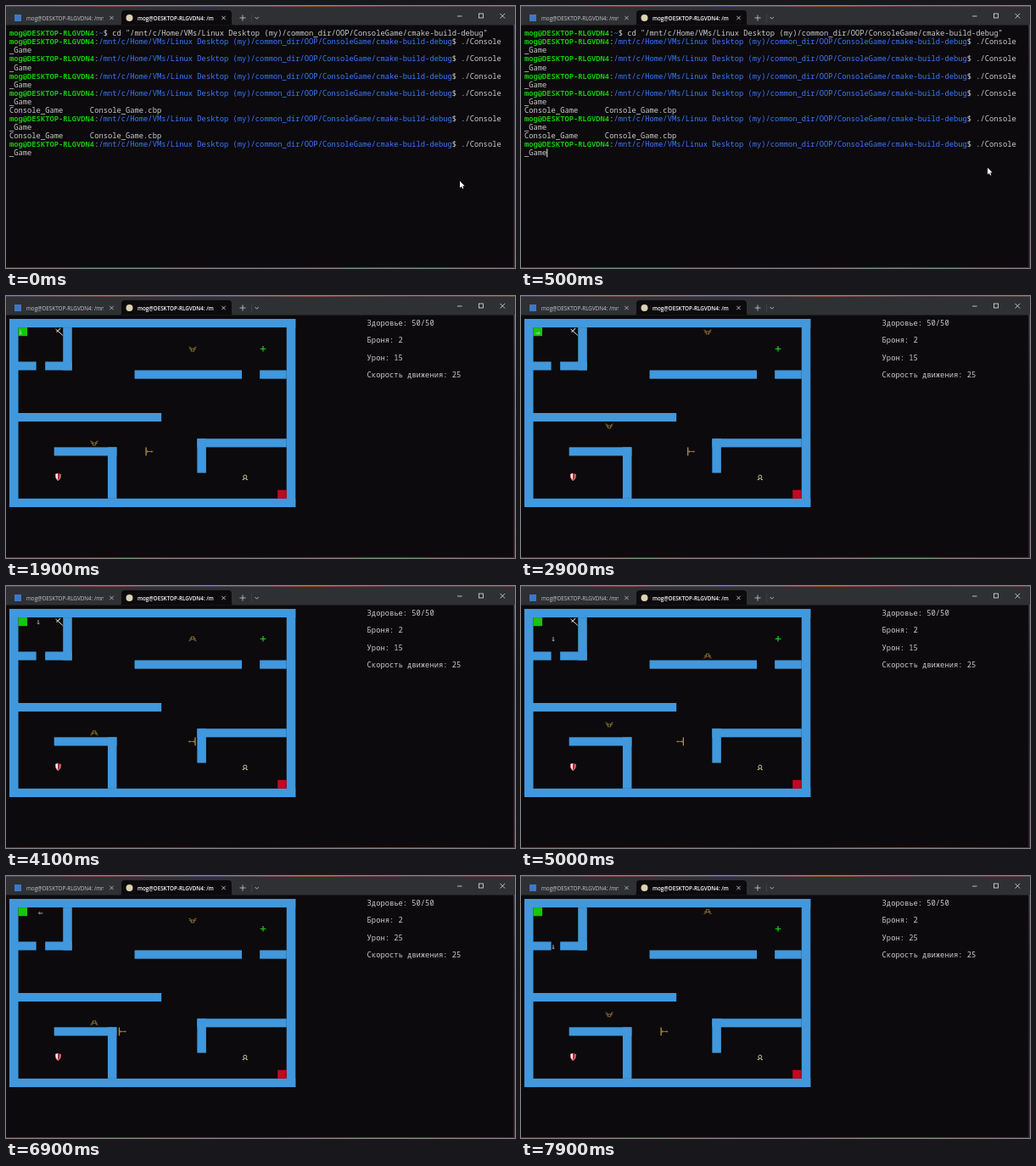
Recreate the animation shown at these times as an HTML page with a canvas. Size 600 by 309 pixels, loop 8000 ms.

```html
<!DOCTYPE html>
<html lang="en">
<head>
<meta charset="utf-8">
<title>Console game</title>
<style>
  html, body { margin: 0; width: 100%; height: 100%; overflow: hidden; background: #0c0a0c; }
  canvas { display: block; width: 600px; height: 309px; }
</style>
</head>
<body>
<canvas id="stage"></canvas>
<script>
const W = 600, H = 309, LOOP = 8000, STEP = 100;
const GAME_START = 1900, PICKUP = 6300;
const X0 = 4, Y0 = 27, CW = 5.27, CELL = CW * 2, ROW = 10.09;
const MONO = '"Noto Sans Mono", "DejaVu Sans Mono", monospace';
const UI = '"Open Sans", "Noto Sans", sans-serif';
const GREY = '#cccccc', GREEN = '#16c60c', BLUE = '#3b78ff', WALL = '#4198dc';
const HOST = 'mog@DESKTOP-RLGVDN4';
const DIR = '/mnt/c/Home/VMs/Linux Desktop (my)/common_dir/OOP/ConsoleGame/cmake-build-debug';

const canvas = document.getElementById('stage');
const ctx = canvas.getContext('2d');
const dpr = window.devicePixelRatio || 1;
canvas.width = W * dpr;
canvas.height = H * dpr;

// Walls in cells: column, row, width, height
const WALLS = [
  [0, 0, 32, 1], [0, 21, 32, 1], [0, 0, 1, 22], [31, 0, 1, 22],
  [0, 5, 3, 1], [4, 5, 3, 1], [6, 1, 1, 5],
  [14, 6, 12, 1], [28, 6, 3, 1], [0, 11, 17, 1],
  [5, 15, 7, 1], [11, 15, 1, 6], [21, 14, 10, 1], [21, 14, 1, 4]
];

// Player poses: time, column, row, glyph
const POSES = [
  [1900, 1, 1, '⇓'], [2800, 1, 1, '⇒'], [3200, 2, 1, '⇒'], [3400, 3, 1, '⇒'],
  [3600, 3, 1, '⇓'], [4200, 3, 2, '⇓'], [4800, 3, 3, '⇓'], [5300, 3, 3, '⇑'],
  [5500, 3, 2, '⇑'], [5800, 3, 1, '⇑'], [5900, 3, 1, '⇒'], [6100, 4, 1, '⇒'],
  [6300, 5, 1, '⇒'], [6500, 5, 1, '⇐'], [6700, 4, 1, '⇐'], [6900, 3, 1, '⇐'],
  [7100, 3, 1, '⇓'], [7600, 3, 2, '⇓'], [7700, 3, 3, '⇓'], [7800, 3, 4, '⇓'],
  [7900, 3, 5, '⇓']
];

const colX = c => X0 + c * CELL;
const rowY = r => Y0 + r * ROW;

function rect(x, y, w, h, color) {
  ctx.fillStyle = color;
  ctx.fillRect(x, y, w, h);
}

function disc(x, y, r, color) {
  ctx.fillStyle = color;
  ctx.beginPath();
  ctx.arc(x, y, r, 0, Math.PI * 2);
  ctx.fill();
}

// Each line is a flat list of x, y pairs
function strokes(lines, color, width = 1) {
  ctx.strokeStyle = color;
  ctx.lineWidth = width;
  ctx.beginPath();
  for (const p of lines) {
    ctx.moveTo(p[0], p[1]);
    for (let i = 2; i < p.length; i += 2) ctx.lineTo(p[i], p[i + 1]);
  }
  ctx.stroke();
}

function at(x, y, sx, sy, draw) {
  ctx.save();
  ctx.translate(x, y);
  ctx.scale(sx, sy);
  draw();
  ctx.restore();
}

// Writes on the terminal grid, returns the next free column
function write(text, col, row, color = GREY, weight = 500) {
  ctx.font = `${weight} 8.78px ${MONO}`;
  ctx.fillStyle = color;
  for (const ch of text) ctx.fillText(ch, X0 + CW * col++, rowY(row) + 8.2);
  return col;
}

function prompt(row, dir, command) {
  let col = write(HOST, 0, row, GREEN, 600);
  col = write(':', col, row);
  col = write(dir, col, row, BLUE);
  write('$ ' + command, col, row);
}

function strip(x, y, w, h, colors) {
  const g = ctx.createLinearGradient(x, y, w > h ? x + w : x, w > h ? y : y + h);
  colors.forEach((c, i) => g.addColorStop(i / (colors.length - 1), c));
  rect(x, y, w, h, g);
}

function cross(x, y, r, color) {
  strokes([[x - r, y - r, x + r, y + r], [x - r, y + r, x + r, y - r]], color, 0.8);
}

function tabTitle(text, x, color, weight) {
  ctx.save();
  ctx.beginPath();
  ctx.rect(x, 5, 91, 17);
  ctx.clip();
  ctx.font = `${weight} 6.3px ${UI}`;
  ctx.fillStyle = color;
  ctx.fillText(text, x, 16.5);
  ctx.restore();
}

function drawWindow() {
  rect(0, 0, W, H, '#0c0a0c');
  rect(0, 0, W, 22.5, '#2f3033');
  strip(0, 0, W, 1, ['#4a4468', '#7a4a3c', '#4c4a78', '#8a5238', '#5a3c50', '#6c4a44']);
  strip(598.5, 22, 1.5, H - 22, ['#4a4a58', '#33303c', '#3c3444', '#4a3038']);
  strip(0, 308, W, 1, ['#4a3034', '#5c3430', '#3c3040', '#6a3c34', '#402c38']);

  ctx.fillStyle = '#0c0a0c';
  ctx.beginPath();
  ctx.moveTo(134, 22.5);
  ctx.quadraticCurveTo(136, 22.5, 136, 20);
  ctx.lineTo(136, 9);
  ctx.quadraticCurveTo(136, 5, 140, 5);
  ctx.lineTo(262, 5);
  ctx.quadraticCurveTo(266, 5, 266, 9);
  ctx.lineTo(266, 20);
  ctx.quadraticCurveTo(266, 22.5, 268, 22.5);
  ctx.fill();

  rect(10, 10, 8, 8, '#3c78c8');
  disc(145.5, 14, 4, '#dcd2b4');
  tabTitle(HOST + ': /mn', 24, '#c8c8ca', 400);
  tabTitle(HOST + ': /m', 155, '#ffffff', 600);
  cross(124.5, 14, 2.2, '#c4c4c6');
  cross(256.5, 14, 2.2, '#e4e4e4');
  strokes([[275.5, 14, 282.5, 14], [279, 10.5, 279, 17.5]], '#d0d0d2', 0.8);
  strokes([[289.5, 9, 289.5, 19]], '#4a4b4e', 0.6);
  strokes([[293.5, 13, 295.7, 15.2, 297.9, 13]], '#d0d0d2', 0.8);

  strokes([[532, 12, 537.5, 12]], '#e4e4e4', 0.8);
  ctx.strokeRect(557.5, 9, 5, 5);
  cross(585.3, 11.7, 2.8, '#e4e4e4');
}

// Share of the span from a to b that has passed at t
function progress(t, a, b) {
  if (t <= a) return 0;
  return t >= b ? 1 : (t - a) / (b - a);
}

function pointer(t) {
  const a = progress(t, 0, 600), b = progress(t, 700, 1100);
  at(535 + 18 * a + 7.5 * b, 206.5 - 19 * a - 12.5 * b, 1, 1, () => {
    ctx.beginPath();
    [[0, 0], [0, 8], [1.9, 6.3], [3.1, 9.1], [4.3, 8.6], [3.1, 5.9], [5.6, 5.8]]
      .forEach(p => ctx.lineTo(...p));
    ctx.closePath();
    ctx.fillStyle = '#ffffff';
    ctx.fill();
  });
}

function drawShell(t) {
  prompt(0, '~', `cd "${DIR}"`);
  for (const row of [1, 3, 5, 7, 10, 13]) {
    prompt(row, DIR, './Console');
    write('_Game', 0, row + 1);
  }
  for (const row of [9, 12]) {
    write('Console_Game', 0, row);
    write('Console_Game.cbp', 18, row);
  }
  if (t >= 300) rect(X0 + CW * 5, rowY(14), 0.9, ROW, '#ffffff');
  pointer(t);
}

// Walks between lo and hi; turning at an end costs one tick
function patrol(tick, lo, hi) {
  const half = hi - lo + 1;
  const n = tick % (2 * half);
  return n < half ? { pos: lo + n, dir: 1 } : { pos: hi - (n - half), dir: -1 };
}

function bat(col, p) {
  at(colX(col) + 5.2, rowY(p.pos) + 5.2, 1, -p.dir, () => strokes([
    [-4.6, -2.3, -2.3, -1.7, -1.3, 2.3],
    [4.6, -2.3, 2.3, -1.7, 1.3, 2.3],
    [-4, -0.2, -2, 0.6], [4, -0.2, 2, 0.6],
    [-1.7, -0.3, 1.7, -0.3], [-2.2, 2.5, 2.2, 2.5]
  ], '#a08438', 0.8));
}

function lancer(row, p) {
  const x = colX(p.pos) + (p.dir > 0 ? 2 : 9.2);
  at(x, rowY(row) + 5.1, p.dir, 1, () => {
    strokes([[1, -4.9, 1, 4.9]], '#b4943c', 1.3);
    strokes([[1.5, 0, 9.2, 0]], '#a08438', 0.9);
    strokes([[2.6, -1.5, 2.6, 1.5], [7.6, -1.1, 7.6, 1.1]], '#a08438', 0.8);
  });
}

function drawItems(t) {
  if (t < PICKUP) {
    strokes([[58.5, 39, 61, 41.2, 66.8, 46.4]], '#e4e0d4', 1);
    strokes([[59.5, 42.6, 62, 40.4, 64.2, 38]], '#d8d4c8', 1.1);
  }
  strokes([[299.7, 62.3, 306.3, 62.3], [303, 59, 303, 65.6]], GREEN, 1.3);

  at(61.3, 213.5, 1, 1, () => {
    const half = (s, color) => {
      ctx.fillStyle = color;
      ctx.beginPath();
      ctx.moveTo(0, -4.4);
      ctx.lineTo(s * 3.3, -3.5);
      ctx.quadraticCurveTo(s * 3.6, 2, 0, 4.6);
      ctx.fill();
    };
    half(-1, '#f0f0f0');
    half(1, '#d42434');
    strokes([[-3, -3.4, -2.6, 1, 0, 4.2]], '#d42434', 0.6);
    strokes([[3, -3.4, 2.6, 1, 0, 4.2]], '#f0f0f0', 0.6);
  });

  ctx.strokeStyle = '#d8d4a0';
  ctx.lineWidth = 0.9;
  ctx.beginPath();
  ctx.arc(281.8, 213.2, 2, 0, Math.PI * 2);
  ctx.stroke();
  strokes([[278.6, 216.6, 280.4, 216.6, 280.4, 215], [285, 216.6, 283.2, 216.6, 283.2, 215]],
    '#d8d4a0', 0.9);
}

function drawGame(t) {
  for (const [c, r, w, h] of WALLS) rect(colX(c), rowY(r), w * CELL, h * ROW, WALL);
  rect(colX(1), rowY(1), CELL, ROW, GREEN);
  rect(colX(30), rowY(20), CELL, ROW, '#c00a20');
  strokes([[329, 232, 329, 237]], '#8c1020', 0.7);
  drawItems(t);

  const batTick = Math.floor((t - GAME_START) / 440);
  bat(20, patrol(batTick + 7, 1, 5));
  bat(9, patrol(batTick + 3, 12, 14));
  lancer(15, patrol(Math.floor((t - GAME_START) / 333) + 3, 12, 20));

  const [, c, r, glyph] = POSES.filter(p => p[0] <= t).pop();
  write(glyph, c * 2, r, '#e0e0e0');

  const stats = ['Здоровье: 50/50', 'Броня: 2',
    'Урон: ' + (t < PICKUP ? 15 : 25), 'Скорость движения: 25'];
  stats.forEach((s, i) => write(s, 80, i * 2));
}

function render(now) {
  const t = Math.floor((now % LOOP) / STEP) * STEP;
  ctx.setTransform(dpr, 0, 0, dpr, 0, 0);
  drawWindow();
  if (t < GAME_START) drawShell(t);
  else drawGame(t);
}

let start = null;
function loop(now) {
  if (start === null) start = now;
  render(now - start);
  requestAnimationFrame(loop);
}
render(0);
requestAnimationFrame(loop);
</script>
</body>
</html>
```
